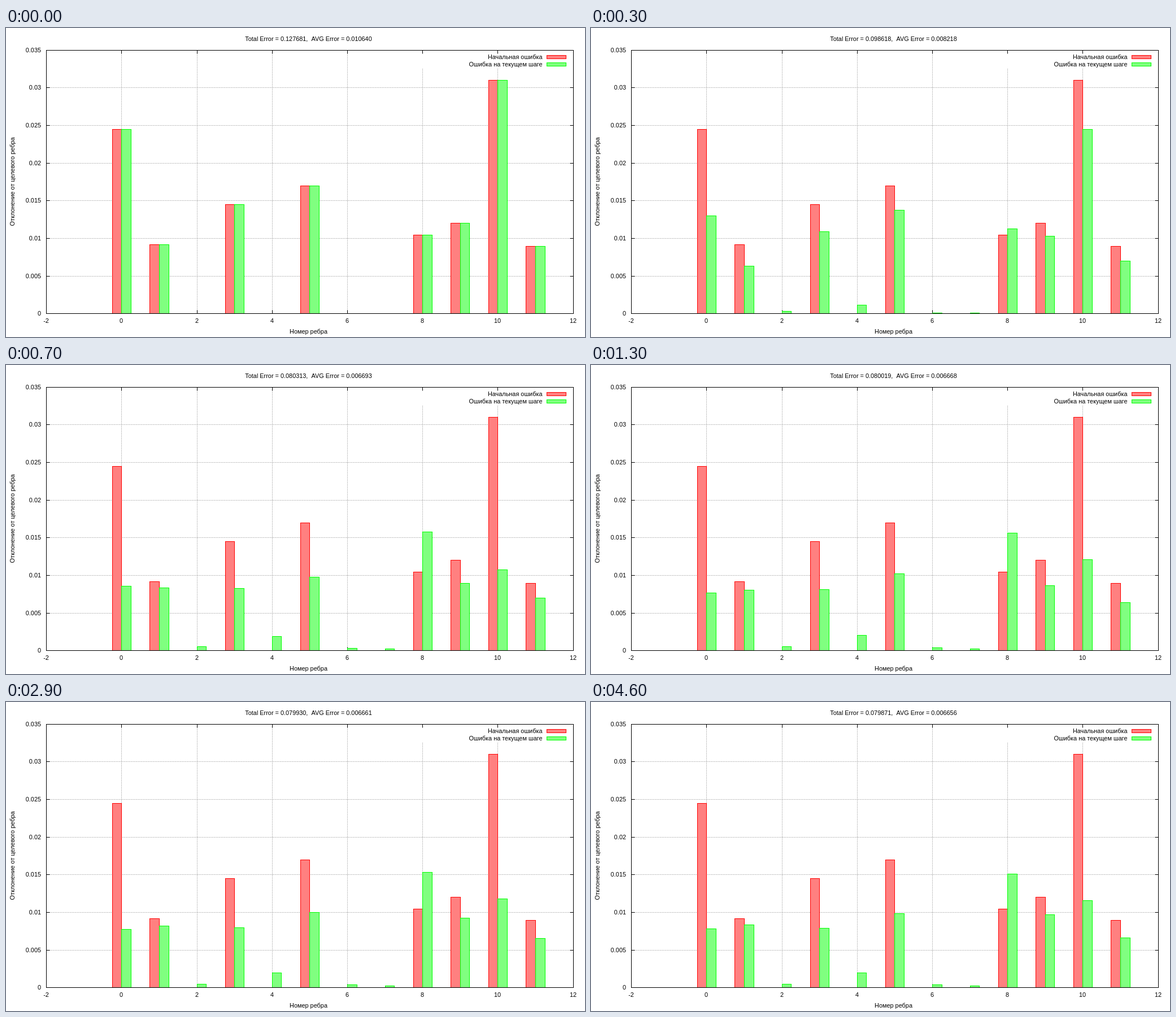
Write an HTML page with a canvas that moves like this. It is 1025x547 px and loops after 5 s.

```html
<!DOCTYPE html>
<html lang="ru">
<head>
<meta charset="utf-8">
<style>
html, body { margin: 0; width: 100%; height: 100%; overflow: hidden; background: #fff; }
canvas { display: block; }
</style>
</head>
<body>
<canvas id="chart" width="1025" height="547"></canvas>
<script>
const ctx = document.getElementById('chart').getContext('2d');
const LEFT = 71, RIGHT = 1004, TOP = 39, BASE = 505, LOOP = 5000;
const RED = ['#ff8080', '#ff0000'], GREEN = ['#80ff80', '#00ff00'];

const settle = x => x * (2 - x);
const smooth = x => x * x * (3 - 2 * x);

// Errors of the twelve edges, in millionths, at the turning points of the run
const initial = [24495, 9189, 0, 14516, 0, 16992, 0, 0, 10464, 12040, 31022, 8963];
const early = [13003, 6325, 323, 10902, 1148, 13753, 68, 68, 11277, 10302, 24449, 7000];
const turn = [8562, 8337, 534, 8262, 1884, 9762, 309, 234, 15765, 8937, 10738, 6989];
const plateau = [7669, 8044, 541, 8119, 2041, 10220, 391, 241, 15622, 8644, 12095, 6392];
const final = [7813, 8338, 460, 7888, 1960, 9838, 385, 235, 15091, 9688, 11564, 6611];

const moves = [
  { start: 0, end: 300, from: initial, to: early, ease: settle },
  { start: 300, end: 700, from: early, to: turn, ease: settle },
  { start: 700, end: 1300, from: turn, to: plateau, ease: settle },
  { start: 2100, end: 3510, from: plateau, to: final, ease: smooth }
];

// Moments, in tenths of a second, when the chart is redrawn with new errors
const ticks = [0, 1, 3, 4, 5, 6, 7, 8, 9, 11, 13, 26, 27, 29, 31, 34, 42];

const xAt = edge => Math.round(71.2 + (edge + 2) * 66.6);
const yAt = error => Math.round(505.3 - error * 66.64 / 5000);

function errorsAt(time) {
  const t = 100 * ticks.findLast(tick => tick * 100 <= time);
  const { start, end, from, to, ease } = moves.findLast(move => move.start <= t);
  const k = ease(Math.min(1, (t - start) / (end - start)));
  return from.map((v, i) => v + (to[i] - v) * k);
}

function line(x1, y1, x2, y2) {
  ctx.beginPath();
  ctx.moveTo(x1 + 0.5, y1 + 0.5);
  ctx.lineTo(x2 + 0.5, y2 + 0.5);
  ctx.stroke();
}

function box(x1, y1, x2, y2, [fill, stroke]) {
  ctx.fillStyle = fill;
  ctx.strokeStyle = stroke;
  ctx.fillRect(x1, y1, x2 - x1 + 1, y2 - y1 + 1);
  ctx.strokeRect(x1 + 0.5, y1 + 0.5, x2 - x1, y2 - y1);
}

function text(str, x, y, align = 'center') {
  ctx.fillStyle = '#000';
  ctx.textAlign = align;
  ctx.fillText(str, x, y);
}

function axes() {
  for (let error = 0; error <= 35000; error += 5000) {
    const y = yAt(error);
    ctx.strokeStyle = '#777';
    ctx.setLineDash([1, 2]);
    line(LEFT, y, RIGHT, y);
    ctx.strokeStyle = '#000';
    ctx.setLineDash([]);
    line(LEFT, y, LEFT + 6, y);
    line(RIGHT - 6, y, RIGHT, y);
    text(String(error / 1e6), 62, y + 4, 'right');
  }
  for (let edge = -2; edge <= 12; edge += 2) {
    const x = xAt(edge);
    ctx.strokeStyle = '#777';
    ctx.setLineDash([1, 2]);
    line(x, edge < 8 ? TOP : 72, x, BASE); // the legend hides the upper part
    ctx.strokeStyle = '#000';
    ctx.setLineDash([]);
    line(x, TOP, x, TOP + 6);
    line(x, BASE - 6, x, BASE);
    text(String(edge), x, 522);
  }
}

function bars(errors, from, to, colors) {
  errors.forEach((error, i) => {
    const top = yAt(error);
    if (top < BASE) box(xAt(i + from), top, xAt(i + to), BASE, colors);
  });
}

function labels(errors) {
  const total = errors.reduce((sum, v) => sum + v) / 1e6;
  const average = total / errors.length;
  text(`Total Error = ${total.toFixed(6)},  AVG Error = ${average.toFixed(6)}`, 535.5, 23);
  text('Номер ребра', 535.5, 541);
  text('Начальная ошибка', 949.5, 55, 'right');
  text('Ошибка на текущем шаге', 949.5, 68, 'right');
  box(957, 48, 991, 54, RED);
  box(957, 61, 991, 67, GREEN);
  ctx.save();
  ctx.translate(14.5, 272);
  ctx.rotate(-Math.PI / 2);
  text('Отклонение от целевого ребра', 0, 0);
  ctx.restore();
}

function draw(time) {
  const errors = errorsAt(time % LOOP);
  ctx.clearRect(0, 0, 1025, 547);
  ctx.font = '10.9px "Liberation Sans", Arial, sans-serif';
  axes();
  bars(initial, -0.25, 0, RED);
  bars(errors, 0, 0.25, GREEN);
  ctx.strokeStyle = '#000';
  ctx.strokeRect(LEFT + 0.5, TOP + 0.5, RIGHT - LEFT, BASE - TOP);
  labels(errors);
}

const begin = performance.now();
function loop() {
  draw(performance.now() - begin);
  requestAnimationFrame(loop);
}
loop();
</script>
</body>
</html>
```
